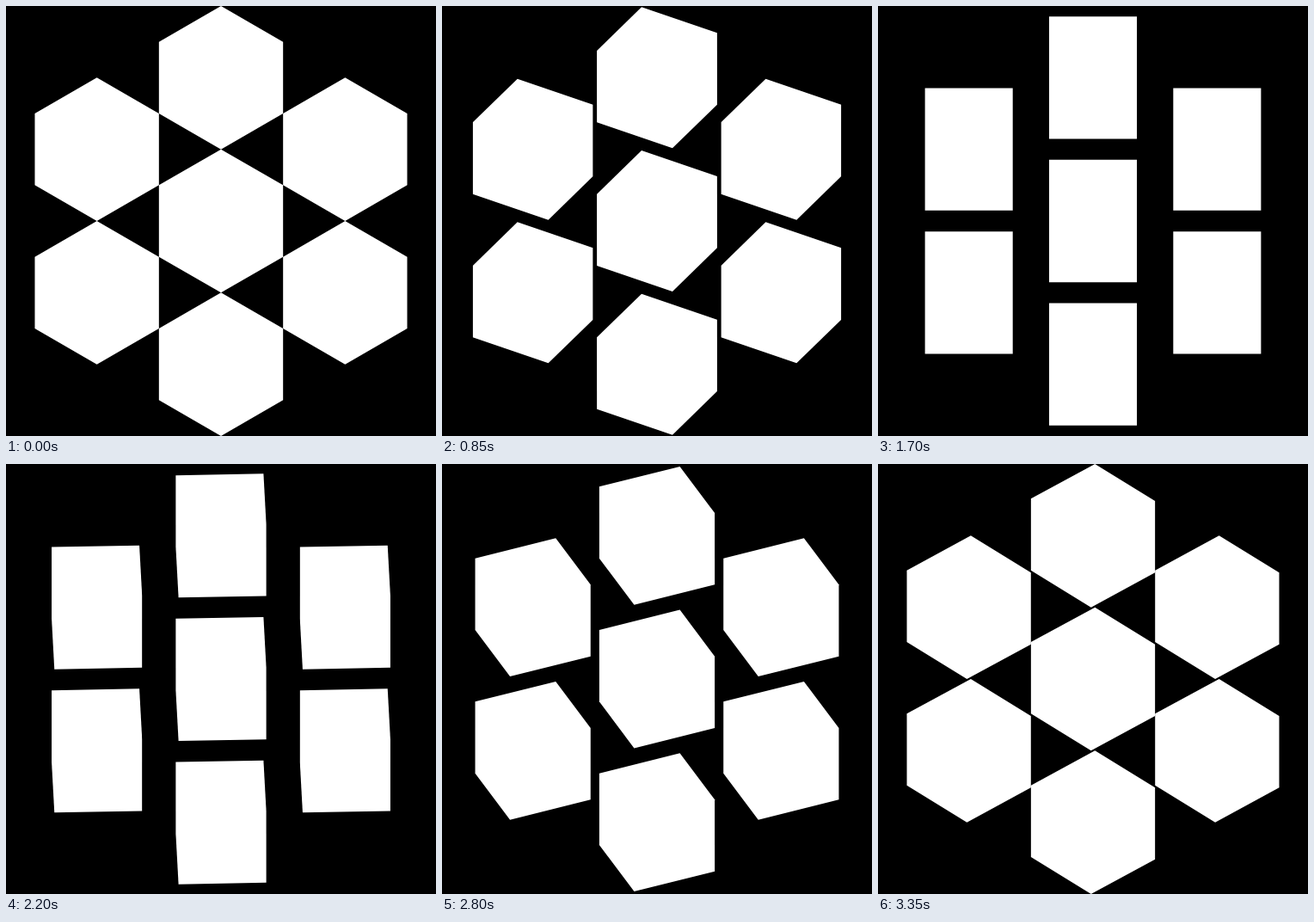
An HTML page without scripts for the animation above (3400 ms loop, 500 px wide and 500 px high).

```html
<!DOCTYPE html>
<html lang="en">
<head>
<meta charset="utf-8">
<title>Turning cubes</title>
<style>
  @property --turn {
    syntax: "<angle>";
    inherits: true;
    initial-value: 0deg;
  }

  html, body {
    margin: 0;
    width: 100%;
    height: 100%;
    overflow: hidden;
    background: #000;
  }

  svg {
    display: block;
    width: 100%;
    height: 100%;
    fill: #fff;
    /* Starts late in the cycle so the loop opens on the hexagon pause. */
    animation: turn 3400ms -2901ms infinite;
  }

  /* Silhouette of an isometric cube spinning about its vertical axis. */
  #cube {
    --cos: cos(var(--turn));
    --sin: sin(var(--turn));
    --rx: 72.169px;
    --ry: 41.667px;
    --left: calc(100px - var(--rx) * var(--cos));
    --right: calc(100px + var(--rx) * var(--cos));
    clip-path: polygon(
      calc(100px - var(--rx) * var(--sin)) calc(100px - var(--ry) * (1 + var(--cos))),
      var(--right) calc(100px - var(--ry) * (1 + var(--sin))),
      var(--right) calc(100px + var(--ry) * (1 - var(--sin))),
      calc(100px + var(--rx) * var(--sin)) calc(100px + var(--ry) * (1 + var(--cos))),
      var(--left) calc(100px + var(--ry) * (1 + var(--sin))),
      var(--left) calc(100px - var(--ry) * (1 - var(--sin)))
    );
  }

  /* An eighth of a turn, a rest face-on, another eighth, a rest. */
  @keyframes turn {
    0%       { --turn: 0deg;   animation-timing-function: steps(25, start); }
    36.7647% { --turn: 45deg;  animation-timing-function: step-end; }
    50%      { --turn: -45deg; animation-timing-function: steps(25, start); }
    86.7647% { --turn: 0deg; }
    100%     { --turn: 0deg; }
  }
</style>
</head>
<body>
<svg viewBox="0 0 500 500">
  <defs>
    <rect id="cube" x="-100" y="-100" width="200" height="200"/>
  </defs>
  <use href="#cube" x="250" y="83.333"/>
  <use href="#cube" x="250" y="250"/>
  <use href="#cube" x="250" y="416.667"/>
  <use href="#cube" x="105.662" y="166.667"/>
  <use href="#cube" x="105.662" y="333.333"/>
  <use href="#cube" x="394.338" y="166.667"/>
  <use href="#cube" x="394.338" y="333.333"/>
</svg>
</body>
</html>
```
